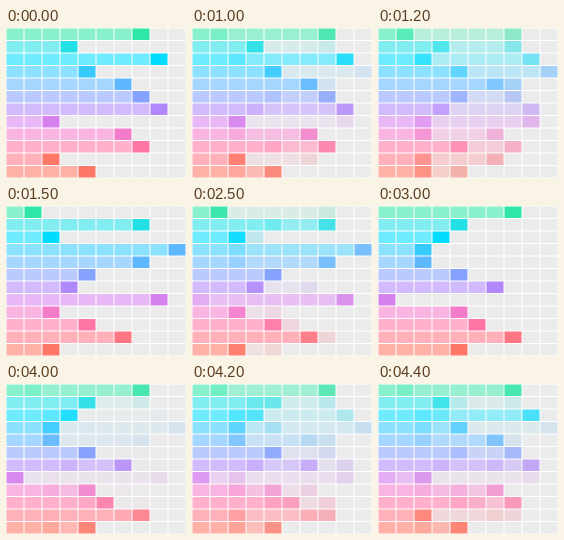
An HTML page with a canvas for the animation above (4.5 s loop, 180 px wide and 150 px high).

```html
<!DOCTYPE html>
<html lang="en">
<head>
<meta charset="utf-8">
<title>Colour bars</title>
<style>
html, body { margin: 0; width: 100%; height: 100%; overflow: hidden; background: #fff; }
canvas { display: block; width: 180px; height: 150px; }
</style>
</head>
<body>
<canvas id="stage" width="180" height="150"></canvas>
<script>
const ctx = document.getElementById('stage').getContext('2d');
const LOOP = 4500, STEP = 100, FADE_STEPS = 6;
const COLS = 10, CELL_W = 18, CELL_H = 12.5, GAP = 1;
const TRAIL = 0.57;

const colors = [
  '#2ee6a6', '#22e0e6', '#00dcff', '#36caff', '#5fb8ff', '#86a2ff',
  '#b188fb', '#d681ee', '#f47bca', '#ff75a6', '#ff7582', '#ff7766'
];

// Column of each bar's head, top row first; tints recolour single heads.
const charts = [
  { heads: [7, 3, 8, 4, 6, 7, 8, 2, 6, 7, 2, 4], tints: { 10: '#ff7766' } },
  { heads: [1, 7, 2, 9, 7, 4, 3, 8, 2, 4, 6, 2], tints: { 3: '#5fb8ff' } },
  { heads: [7, 4, 3, 2, 2, 4, 6, 0, 4, 5, 7, 4], tints: {} }
];

function paint({ heads, tints }) {
  const layer = document.createElement('canvas');
  layer.width = 180;
  layer.height = 150;
  const c = layer.getContext('2d');
  c.fillStyle = '#fff';
  c.fillRect(0, 0, 180, 150);
  // White grid lines are centred on the cell borders.
  c.translate(GAP / 2, GAP / 2);
  heads.forEach((head, row) => {
    for (let col = 0; col < COLS; col++) {
      const isHead = col === head;
      c.globalAlpha = col < head ? TRAIL : 1;
      c.fillStyle = col > head ? '#ebebeb' : (isHead && tints[row]) || colors[row];
      c.fillRect(col * CELL_W, row * CELL_H, CELL_W - GAP, CELL_H - GAP);
    }
  });
  return layer;
}

const layers = charts.map(paint);

// Opacity climbs in even steps, the first one at the start time.
function stepped(t, start) {
  const n = Math.floor((t - start) / STEP) + 1;
  return Math.max(0, Math.min(FADE_STEPS, n)) / FADE_STEPS;
}

function draw(now) {
  const t = now % LOOP;
  const out = 1 - stepped(t, 4000);
  // Both upper layers fade away together to uncover the first chart.
  const alphas = [1, stepped(t, 1000) * out, stepped(t, 2500) * out];
  layers.forEach((layer, i) => {
    ctx.globalAlpha = alphas[i];
    ctx.drawImage(layer, 0, 0);
  });
}

const start = performance.now();
function tick() {
  draw(performance.now() - start);
  requestAnimationFrame(tick);
}
tick();
</script>
</body>
</html>
```
